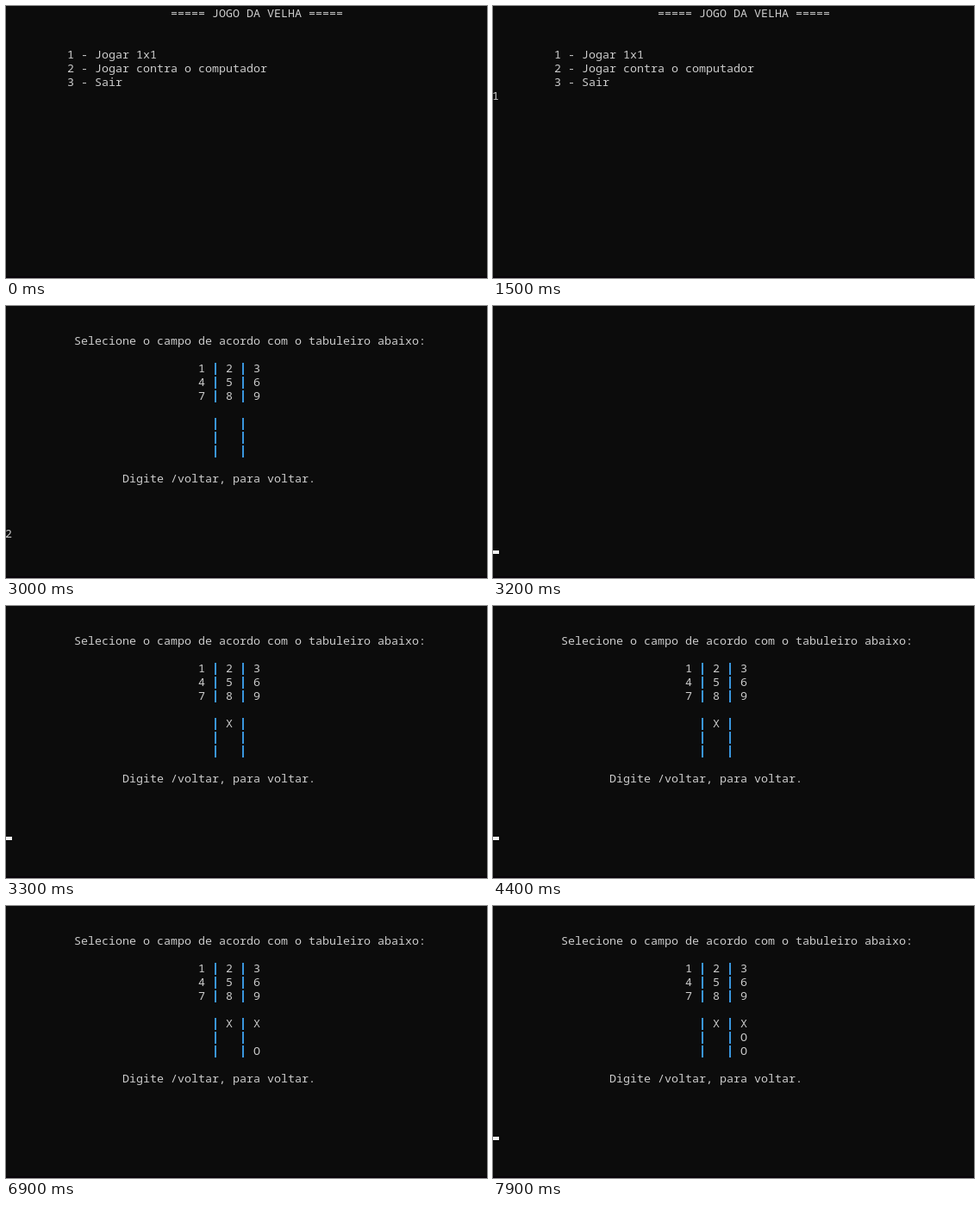
An HTML page with a canvas that plays this animation: 558 by 316 pixels, repeating every 8 s.

```html
<!DOCTYPE html>
<html lang="pt-BR">
<head>
<meta charset="utf-8">
<title>Jogo da velha</title>
<style>
  html, body { margin: 0; width: 100%; height: 100%; overflow: hidden; background: #0c0c0c; }
  canvas { display: block; }
</style>
</head>
<body>
<canvas id="stage" width="558" height="316"></canvas>
<script>
const ctx = document.getElementById("stage").getContext("2d", { alpha: false });
const LOOP = 8000;
const CELL_W = 8, CELL_H = 16, LEFT = -1, BASELINE = 13;
const INPUT_ROW = 16;

function rect(color, x, y, w, h) {
  ctx.fillStyle = color;
  ctx.fillRect(x, y, w, h);
}

// Each character sits in its own console cell; bars are blue strokes.
function print(col, row, text) {
  [...text].forEach((char, i) => {
    const x = LEFT + (col + i) * CELL_W;
    if (char === "|") {
      rect("#3a96dd", x + 3, row * CELL_H + 2, 2, 14);
    } else if (char !== " ") {
      ctx.fillStyle = "#cccccc";
      ctx.fillText(char, x + CELL_W / 2, row * CELL_H + BASELINE);
    }
  });
}

function cursor(col, row) {
  rect("#f2f2f2", LEFT + col * CELL_W, row * CELL_H + 12, CELL_W, 4);
}

function grid(row, marks) {
  for (let i = 0; i < 3; i++) {
    print(28, row + i, [...marks.slice(i * 3, i * 3 + 3)].join(" | "));
  }
}

function menu() {
  print(24, 0, "===== JOGO DA VELHA =====");
  print(9, 3, "1 - Jogar 1x1");
  print(9, 4, "2 - Jogar contra o computador");
  print(9, 5, "3 - Sair");
}

function game(marks) {
  print(10, 2, "Selecione o campo de acordo com o tabuleiro abaixo:");
  grid(4, "123456789");
  grid(8, marks);
  print(17, 12, "Digite /voltar, para voltar.");
}

const blank = () => {};
const empty = () => game("         ");
const first = () => game(" X       ");
const second = () => game(" X      O");
const third = () => game(" XX     O");
const fourth = () => game(" XX  O  O");

// [start, screen, typed text, input row, cursor column, cursor row]
const steps = [
  [0, menu],
  [500, menu, "1", 6, 1, 6],
  [600, menu, "1", 6],
  [1100, menu, "1", 6, 1, 6],
  [1500, menu, "1", 6],
  [1800, blank, "", 6, 0, 7],
  [1900, empty, "", INPUT_ROW, 0, INPUT_ROW],
  [2500, empty],
  [3000, empty, "2", INPUT_ROW],
  [3200, blank, "", INPUT_ROW, 0, INPUT_ROW + 1],
  [3300, first, "", INPUT_ROW, 0, INPUT_ROW],
  [4000, first],
  [4400, first, "", INPUT_ROW, 0, INPUT_ROW],
  [4500, first, "9", INPUT_ROW, 1, INPUT_ROW],
  [4700, first, "9", INPUT_ROW, 0, INPUT_ROW + 1],
  [4800, second, "", INPUT_ROW, 0, INPUT_ROW],
  [5400, second],
  [5700, second, "3", INPUT_ROW, 1, INPUT_ROW],
  [5900, second, "3", INPUT_ROW, 0, INPUT_ROW + 1],
  [6000, third, "", INPUT_ROW, 0, INPUT_ROW],
  [6900, third],
  [7300, third, "", INPUT_ROW, 0, INPUT_ROW],
  [7600, third, "6", INPUT_ROW, 1, INPUT_ROW],
  [7800, third, "6", INPUT_ROW, 0, INPUT_ROW + 1],
  [7900, fourth, "", INPUT_ROW, 0, INPUT_ROW]
];

function draw(time) {
  const [, screen, typed = "", inputRow, cursorCol, cursorRow] =
    steps.findLast(([start]) => start <= time);
  rect("#0c0c0c", 0, 0, 558, 316);
  rect("#080409", 0, 314, 558, 2);
  ctx.font = "13.333px 'Noto Sans Mono', 'DejaVu Sans Mono', monospace";
  ctx.textAlign = "center";
  screen();
  print(0, inputRow, typed);
  if (cursorRow !== undefined) cursor(cursorCol, cursorRow);
}

function tick() {
  draw(performance.now() % LOOP);
  requestAnimationFrame(tick);
}
tick();
</script>
</body>
</html>
```
